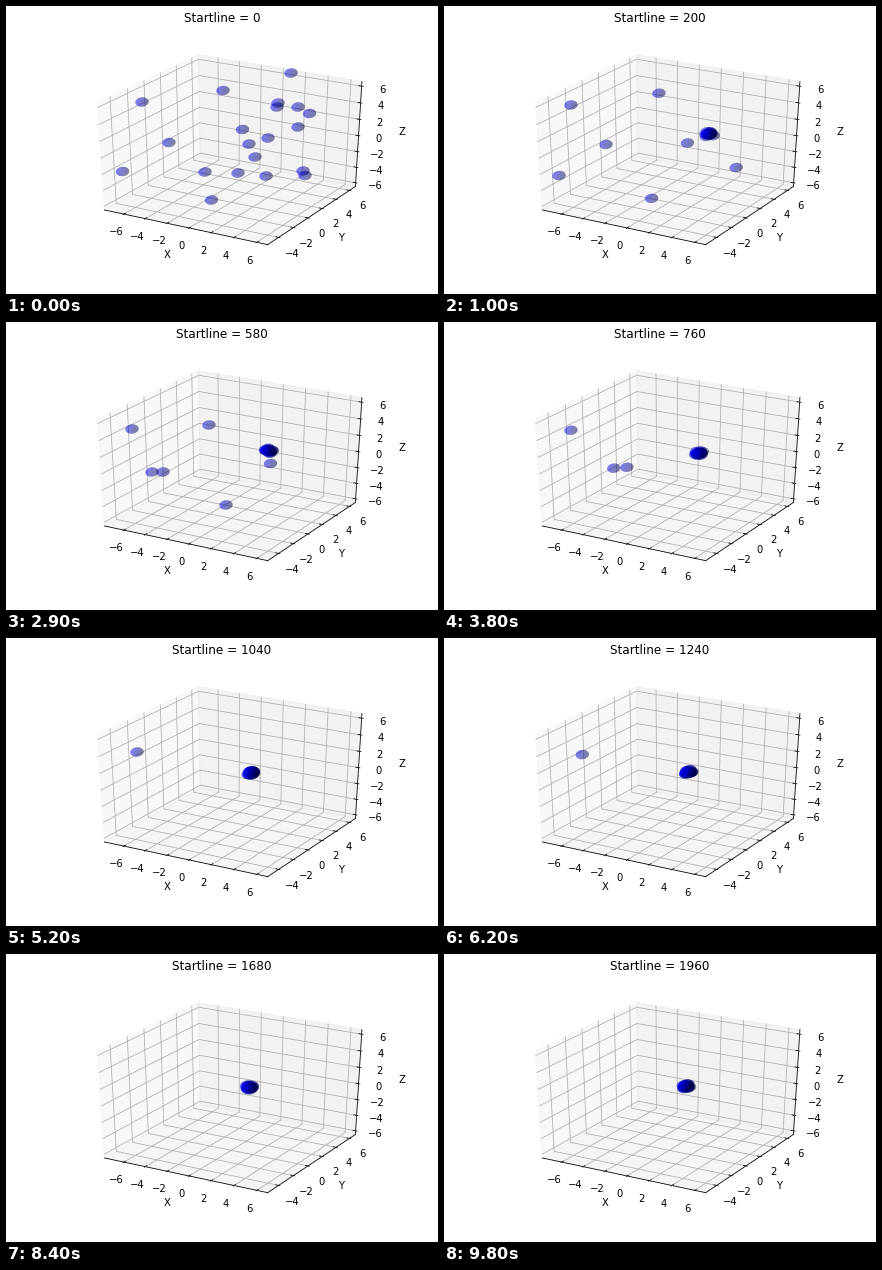
Write a matplotlib script that moves like this. It is 432 by 288 pixels and loops after 9900 ms.

```python
import numpy as np
import matplotlib.pyplot as plt
from matplotlib.animation import FuncAnimation
from matplotlib.collections import PolyCollection

plt.rcParams["font.family"] = "DejaVu Sans"

W, H, DPI = 432, 288, 72
FRAMES, INTERVAL = 99, 100
LIMITS = np.array([(-7.53, 6.65), (-5.18, 6.65), (-6.21, 6.29)])
SPAN = LIMITS[:, 1] - LIMITS[:, 0]
LO, HI = -1 / 48, 1 + 1 / 48

# Camera at elevation 30, azimuth -60, ten units from the unit cube's centre
S3 = np.sqrt(3) / 2
EYE = np.array([S3 / 2, -0.75, 0.5])
RIGHT = np.array([S3, 0.5, 0])
UP = np.array([-0.25, S3 / 2, S3])
DIST = 10
LEFT, BASE = 0.125 * W, H - 0.125 * H
SCALE_X, SCALE_Y = 0.775 * W / 0.185, 0.755 * H / 0.185


def project(p):
    """Unit-cube point to stage pixels."""
    d = np.asarray(p) - 0.5
    w = DIST - d @ EYE
    return LEFT + SCALE_X * (d @ RIGHT / w + 0.095), BASE - SCALE_Y * (d @ UP / w + 0.095)


def put(point, axis, value):
    q = np.array(point, float)
    q[axis] = value
    return q


def flip(point, axis):
    return put(point, axis, 1 - point[axis])


fig = plt.figure(figsize=(W / DPI, H / DPI), dpi=DPI, facecolor="white")
ax = fig.add_axes([0, 0, 1, 1])
ax.set_xlim(0, W)
ax.set_ylim(H, 0)
ax.axis("off")
title = fig.suptitle("Startline = 0", fontsize=12)

BACK = np.array([LO, HI, LO])


def draw_line(points, color):
    xs, ys = zip(*(project(p) for p in points))
    ax.plot(xs, ys, color=color, lw=0.8)


def draw_text(point, text, va):
    ax.text(*project(point), text, fontsize=10, ha="center", va=va)


def draw_pane(axis, grey):
    a, b = (axis + 1) % 3, (axis + 2) % 3
    corners = [BACK, flip(BACK, a), flip(flip(BACK, a), b), flip(BACK, b)]
    ax.add_patch(plt.Polygon([project(c) for c in corners], lw=1, alpha=0.5,
                             facecolor=(grey,) * 3, edgecolor=(grey,) * 3))


def draw_axis(axis, edge, tick_dir, name):
    out = np.sign(np.array(edge) - 0.5)
    out[axis] = 0
    low, high = LIMITS[axis]
    draw_line([put(edge, axis, LO), put(edge, axis, HI)], "black")
    draw_text(put(edge, axis, 0.5) + 0.1811 * out, name, "center")
    for v in range(-6, 7, 2):
        if not low <= v <= high:
            continue
        u = (v - low) / SPAN[axis]
        corner = put(BACK, axis, u)
        draw_line([flip(corner, (axis + 1) % 3), corner,
                   flip(corner, (axis + 2) % 3)], "#b0b0b0")
        at = put(edge, axis, u)
        step = put(np.zeros(3), tick_dir, out[tick_dir] / 12)
        draw_line([at + 0.1 * step, at - 0.2 * step], "black")
        draw_text(at + 0.0833 * out, str(v).replace("-", "\u2212"), "top")


for i, grey in enumerate((0.95, 0.90, 0.925)):
    draw_pane(i, grey)
draw_axis(0, (0, LO, LO), 1, "X")
draw_axis(1, (HI, 0, LO), 0, "Y")
draw_axis(2, (HI, HI, 0), 0, "Z")


def ball_mesh(radius=0.5, nu=20, nv=10):
    """Face outlines in pixels around the centre, and shaded colours, far first."""
    u, v = np.meshgrid(np.linspace(0, 2 * np.pi, nu + 1),
                       np.linspace(0, np.pi, nv + 1), indexing="ij")
    n = np.stack([np.cos(u) * np.sin(v), np.sin(u) * np.sin(v), np.cos(v)], -1)
    faces = np.stack([n[:-1, :-1], n[1:, :-1], n[1:, 1:], n[:-1, 1:]], 2).reshape(-1, 4, 3)
    mid = faces.mean(1)
    mid /= np.linalg.norm(mid, axis=1, keepdims=True)
    order = np.argsort((mid / SPAN) @ EYE)
    faces, mid = faces[order], mid[order]
    p = radius * faces / SPAN / DIST
    outline = np.stack([p @ RIGHT * SCALE_X, -(p @ UP) * SCALE_Y], -1)
    lit = (1 + mid @ np.array([-1, -1, 0.5]) / 1.5) / 2
    colors = np.zeros((len(mid), 4))
    colors[:, 2] = 0.2 + 0.8 * lit
    colors[:, 3] = 0.3
    return outline, colors


def hub(t):
    """Centre of the clump: one smooth shift left, then a slow drift."""
    s = np.clip((t - 2.2) / 3.2, 0, 1)
    shift = s * s * (3 - 2 * s)
    late = (t / 9.8) ** 4
    return np.array([265 - 20 * shift - 3 * late, 128 + 6.5 * shift - 2 * late])


def body(start, end=None, bends=()):
    """Way points (time, x, y) from the start, past any bends, into the clump."""
    if end is None:
        end = 0.25 + 0.01 * np.hypot(*(hub(0) - start))
    return [(0, *start), *bends, (end, *hub(end))]


# Bodies that linger before they are drawn in
BODIES = [
    body((136, 96), 8.2, [(1, 127, 99), (2.9, 126, 107), (5.2, 131, 114), (7.2, 156.5, 123)]),
    body((217, 84.5), 3.7, [(2.9, 203, 103)]),
    body((163, 136.5), 4.7, [(2.9, 157, 150)]),
    body((116.5, 165.5), 4.9, [(1, 115, 169.5), (2.9, 146, 150)]),
    body((205.5, 194), 3.7, [(2.9, 220, 183)]),
    body((297, 165), 3.3, [(2.9, 264.5, 141.5)]),
    body((243, 138), 1.9, [(1, 243.5, 137)]),
]
# Bodies that fall straight in
BODIES += [body(p) for p in (
    (285, 67), (272, 97), (271, 101), (292, 101), (303.5, 107.5), (292, 121),
    (236.5, 123.5), (262, 132), (249, 151), (199, 166), (232, 167), (260, 170),
    (299, 169.5))]


def orbit(k, t, since):
    """Wobble of body k inside the clump, spread by the golden ratio."""
    reach = (3.8 + 2 * np.exp(-t / 1.5)) * min(1, since / 0.3)
    reach *= 0.2 + 0.8 * (k * 0.618 % 1)
    angle = (4 + 0.3 * k) * t + 2.4 * k
    return reach * np.array([np.cos(angle), 0.8 * np.sin(angle)])


def place(k, t):
    """Each leg speeds up from its way point; afterwards the body circles the hub."""
    path = BODIES[k]
    for (t0, *p0), (t1, *p1) in zip(path, path[1:]):
        if t < t1:
            s = ((t - t0) / (t1 - t0)) ** 1.8
            return (1 - s) * np.array(p0) + s * np.array(p1)
    return hub(t) + orbit(k, t, t - path[-1][0])


outline, shades = ball_mesh()
balls = PolyCollection([], facecolors=np.tile(shades, (len(BODIES), 1)),
                       edgecolors="none", linewidths=0, zorder=4)
ax.add_collection(balls, autolim=False)


def update(frame):
    t = frame * INTERVAL / 1000
    spots = np.array([place(k, t) for k in range(len(BODIES))])
    verts = spots[:, None, None, :] + outline[None]
    balls.set_verts(verts.reshape(-1, 4, 2))
    title.set_text(f"Startline = {20 * frame}")
    return balls, title


anim = FuncAnimation(fig, update, frames=FRAMES, interval=INTERVAL,
                     repeat=True, repeat_delay=0, blit=False)
plt.show()
```
